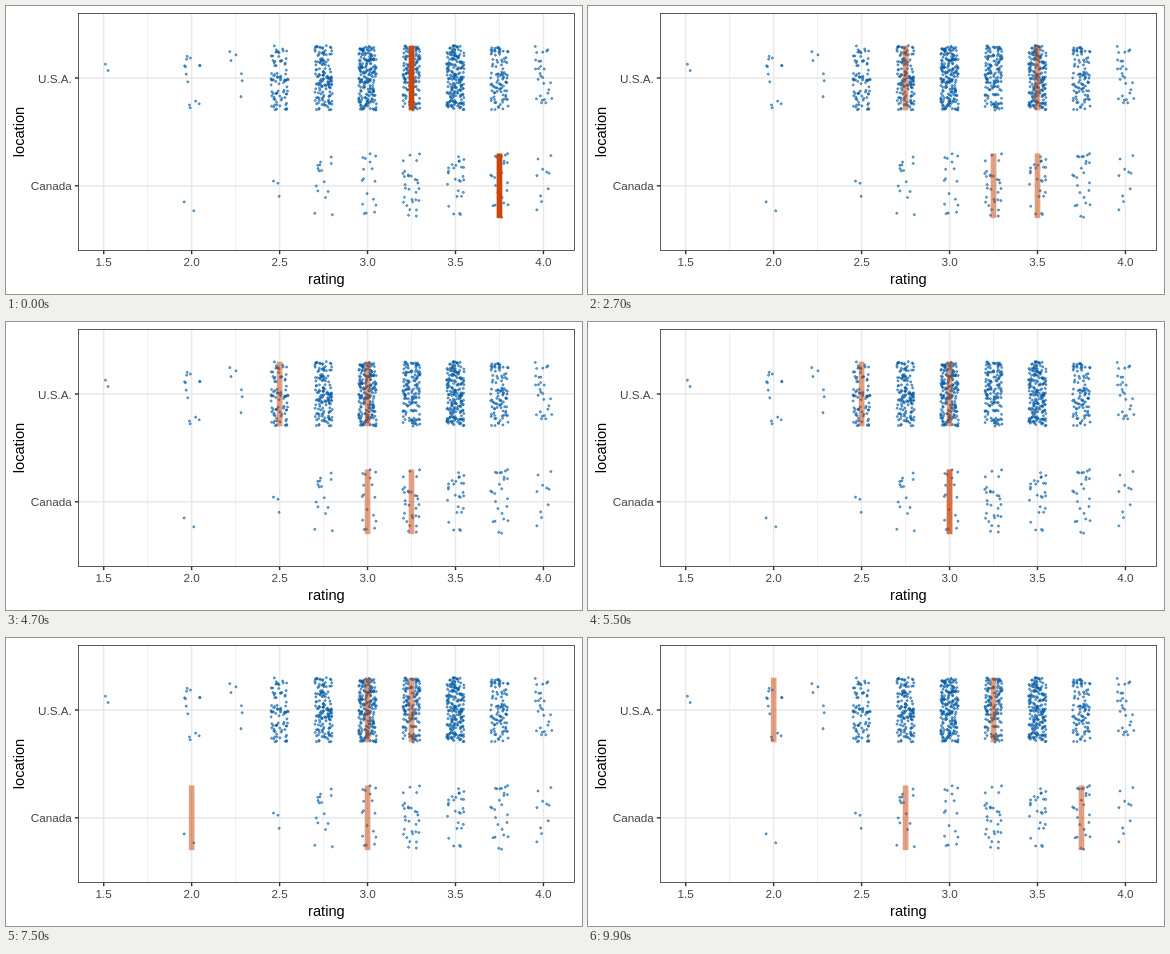
These frames come from a looping animation (576x288 px, 10 s). An HTML page:

```html
<!DOCTYPE html>
<html lang="en">
<head>
<meta charset="utf-8">
<title>Ratings by location</title>
<style>
  html, body { margin: 0; width: 100%; height: 100%; overflow: hidden; background: #fff; }
  svg { display: block; width: 576px; height: 288px; }
  text { font-family: "Liberation Sans", Arial, Helvetica, sans-serif; }
  .label { font-size: 11.73px; fill: #444; }
  .title { font-size: 14.67px; fill: #000; text-anchor: middle; }
  .major { stroke: #e8e8e8; stroke-width: 1.42; }
  .minor { stroke: #e8e8e8; stroke-width: .71; }
  .tick { stroke: #333; stroke-width: 1.42; }
  .frame { fill: none; stroke: #333; stroke-width: .8; }
  .dot { fill: #0a60a8; stroke: #0a60a8; stroke-width: 1; fill-opacity: .55; stroke-opacity: .55; }
  .bar { fill: #c9470a; }
</style>
</head>
<body>
<svg id="stage" viewBox="0 0 576 288"></svg>
<script>
const stage = document.getElementById('stage');
const panel = { left: 72.5, top: 7.5, right: 568.5, bottom: 244.5 };
const rowY = [72, 179.8];
const unitX = 175.9, halfBar = 32.35, barWidth = 5.7;
const xOf = rating => 97.7 + (rating - 1.5) * unitX;

function add(tag, attrs, text) {
  const el = document.createElementNS('http://www.w3.org/2000/svg', tag);
  for (const key in attrs) el.setAttribute(key, attrs[key]);
  if (text) el.textContent = text;
  return stage.appendChild(el);
}
const line = (cls, x1, y1, x2, y2) => add('line', { class: cls, x1, y1, x2, y2 });

// Grid, axes and labels
for (let r = 1.75; r < 4; r += .5) line('minor', xOf(r), panel.top, xOf(r), panel.bottom);
for (const y of rowY) line('major', panel.left, y, panel.right, y);
for (let r = 1.5; r <= 4; r += .5) {
  const x = xOf(r);
  line('major', x, panel.top, x, panel.bottom);
  line('tick', x, panel.bottom, x, panel.bottom + 3.67);
  add('text', { class: 'label', x, y: 259.8, 'text-anchor': 'middle' }, r.toFixed(1));
}
['U.S.A.', 'Canada'].forEach((name, i) => {
  line('tick', panel.left - 3.67, rowY[i], panel.left, rowY[i]);
  add('text', { class: 'label', x: 65.8, y: rowY[i] + 4.6, 'text-anchor': 'end' }, name);
});
add('text', { class: 'title', x: 320.4, y: 277.6 }, 'rating');
add('text', { class: 'title', transform: 'translate(17.6 126) rotate(-90)' }, 'location');

// Dots: how many per rating from 1.5 up in quarters, scattered by seeded jitter
const counts = [
  [2, 0, 13, 6, 82, 145, 205, 145, 200, 98, 27],
  [0, 0, 2, 0, 3, 15, 17, 29, 26, 25, 10]
];
let seed = 20;
function random() {
  seed = (seed + 0x6D2B79F5) | 0;
  let n = Math.imul(seed ^ (seed >>> 15), 1 | seed);
  n = (n + Math.imul(n ^ (n >>> 7), 61 | n)) ^ n;
  return ((n ^ (n >>> 14)) >>> 0) / 2 ** 32;
}
const jitter = size => (random() * 2 - 1) * size;
counts.forEach((row, i) => row.forEach((count, step) => {
  for (let n = 0; n < count; n++) add('circle', {
    class: 'dot', r: 1.06,
    cx: xOf(1.5 + step / 4) + jitter(.05 * unitX),
    cy: rowY[i] + jitter(halfBar)
  });
}));

// One draw per location: [U.S.A., Canada]
const draws = [
  [3.25, 3.75], [3, 3.5], [2.75, 3.25], [3.75, 4], [3, 3.5],
  [3.25, 3], [2.75, 3.5], [3.5, 3.25], [3, 3], [3, 2],
  [3.5, 2.75], [2.5, 3], [3, 3.25], [3, 3], [2.5, 3],
  [3.5, 3.75], [2.75, 3], [3, 3], [3, 2], [3.25, 3],
  [3, 3.5], [2.25, 3.75], [3.5, 3.25], [3, 3.5], [2, 2.75]
];
const makeBars = () => rowY.map(y => add('rect', {
  class: 'bar', y: y - halfBar, width: barWidth, height: 2 * halfBar
}));
const leaving = makeBars(), entering = makeBars();

add('rect', {
  class: 'frame', x: panel.left, y: panel.top,
  width: panel.right - panel.left, height: panel.bottom - panel.top
});

function place(bars, draw, opacity) {
  bars.forEach((bar, i) => {
    bar.setAttribute('x', xOf(draw[i]) - barWidth / 2);
    bar.setAttribute('opacity', opacity);
  });
}

// Each draw holds for 300 ms, then both draws show at half strength for 100 ms
const hold = 300, period = 400;
let start;
function render(now) {
  start ??= now;
  const t = Math.max(0, now - start) % (period * draws.length);
  const k = Math.floor(t / period);
  const fading = t % period >= hold;
  place(leaving, draws[k], fading ? .5 : 1);
  place(entering, draws[(k + 1) % draws.length], fading ? .5 : 0);
  requestAnimationFrame(render);
}
render(performance.now());
</script>
</body>
</html>
```
